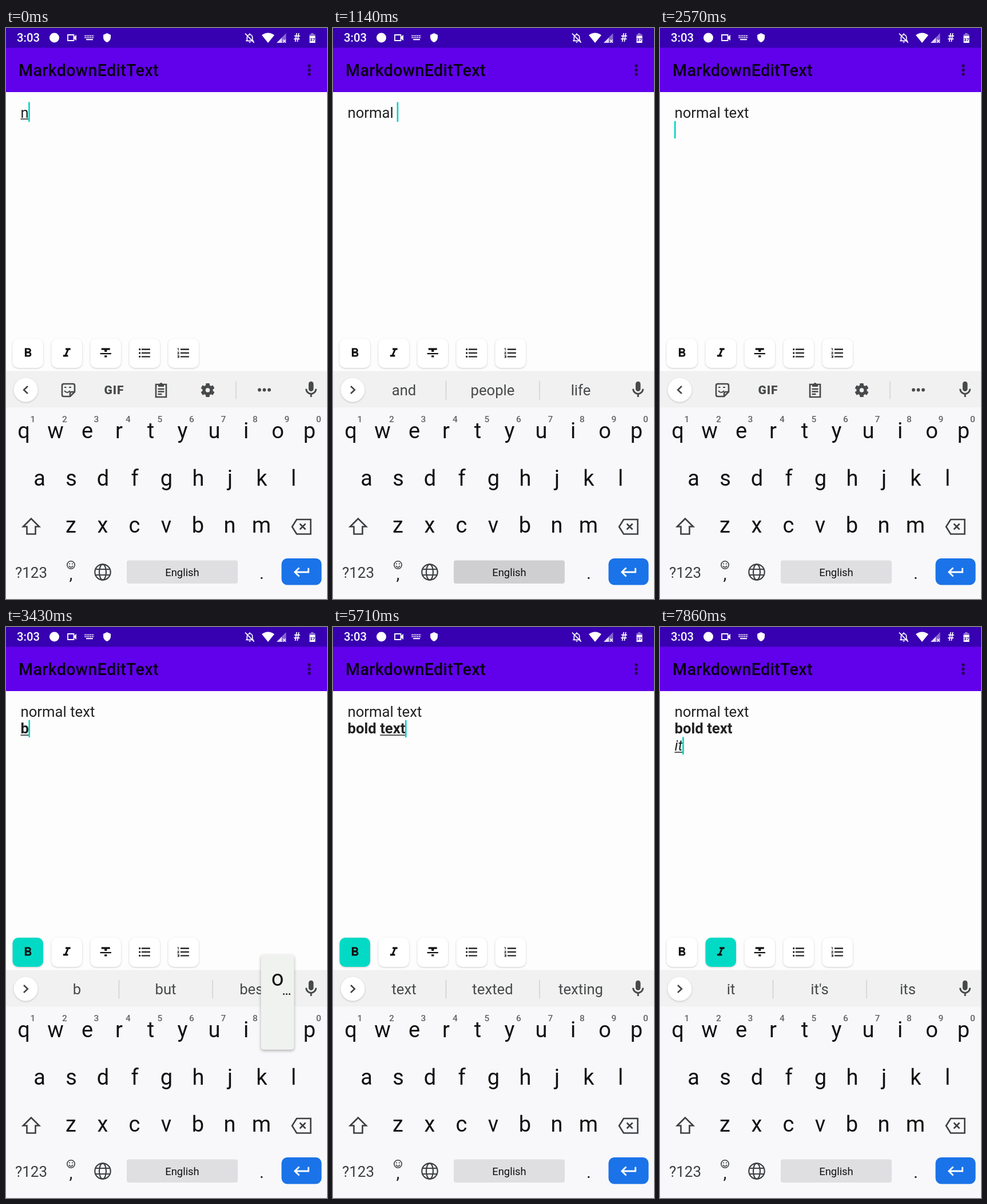
These frames come from a looping animation (561x998 px, 8 s). An HTML page:

```html
<!DOCTYPE html>
<html lang="en">
<head>
<meta charset="utf-8">
<title>Markdown editor</title>
<style>
html, body { margin: 0; width: 100%; height: 100%; overflow: hidden; background: #fefdfe; }
svg { display: block; width: 100vw; height: 100vh; font-family: Roboto, "Noto Sans", sans-serif; }
text { white-space: pre; }
.mid { text-anchor: middle; }
.line { fill: none; stroke: currentColor; stroke-width: 2.6; }
.card { filter: drop-shadow(0 1.5px 1.5px rgba(0, 0, 0, .2)); }
.popup { filter: drop-shadow(0 2px 2.5px rgba(0, 0, 0, .3)); }
</style>
</head>
<body>
<svg viewBox="0 0 561 998">
  <rect width="561" height="998" fill="#fefdfe"/>

  <rect width="561" height="35" fill="#3700b1"/>
  <g fill="#fff" color="#fff">
    <text x="19" y="24.3" font-size="20.3" font-weight="500">3:03</text>
    <circle cx="84.500" cy="17" r="8.500"/>
    <path class="line" style="stroke-width:1.8" d="M108 12h10.500v10H108z"/>
    <path d="M118 16l5-4v10l-5-4z"/>
    <g stroke="#fff" stroke-width="2" stroke-dasharray="2 1.2" fill="none">
      <path d="M137.500 13.500H154M137.500 16.700H154"/>
      <path d="M140 20.200H152" stroke-dasharray="none"/>
    </g>
    <path transform="translate(167.900 8.400) scale(.72)" d="M12 1L3 5v6c0 5.550 3.840 10.740 9 12 5.160-1.260 9-6.450 9-12V5z"/>
    <g transform="translate(415.800 7) scale(.85)">
      <path class="line" style="stroke-width:2" d="M6.500 17.500V11a5.500 5.500 0 0 1 11 0v6.500M4 18h16M12 5V2.500M2.500 3L21 22"/>
      <path d="M10 20h4a2 2 0 0 1-4 0z"/>
    </g>
    <path d="M458 26L447 12.500Q458 4.500 469 12.500z"/>
    <path d="M473 26H489.500V9z" opacity=".4"/>
    <path d="M473 26H482V17z" opacity=".75"/>
    <path d="M484 20.500l5 5m0-5l-5 5" stroke="#fff" stroke-width="1.300"/>
    <text class="mid" x="508.500" y="24" font-size="20" font-weight="700">#</text>
    <path d="M530.500 11h2.500V9h4.500v2h3v5h-10z" opacity=".45"/>
    <path d="M530.500 14h10v12h-10z"/>
    <text class="mid" x="535.500" y="23" font-size="8" font-weight="700" fill="#3700b1">37</text>
  </g>

  <rect y="34.500" width="561" height="77.500" fill="#6100eb"/>
  <text x="22" y="84" font-size="28.600" font-weight="500" letter-spacing=".36" fill="#08000f">MarkdownEditText</text>
  <g fill="#25074f"><circle cx="530" cy="66" r="2.700"/><circle cx="530" cy="73.500" r="2.700"/><circle cx="530" cy="81" r="2.700"/></g>

  <g id="editor" font-size="25.700" fill="#222"></g>
  <rect id="underline" height="1.500" fill="#222"/>
  <rect id="cursor" width="2.700" fill="#08d5c2"/>
  <g id="buttons"></g>

  <rect y="599.500" width="561" height="64" fill="#f0f1f0"/>
  <rect y="663.500" width="561" height="335" fill="#f8f8fa"/>
  <circle class="card" cx="34.500" cy="632.500" r="21" fill="#fff"/>
  <path id="chevron" class="line" color="#444"/>

  <g id="tools" color="#47494b" fill="#47494b">
    <path class="line" d="M101 622h16q3 0 3 3v11l-8 8h-11q-3 0-3-3v-16q0-3 3-3zM120 636h-5q-3 0-3 3v5"/>
    <path class="line" style="stroke-width:2" d="M102 634q5 6 10 0M102 628h3.500M110 628h4"/>
    <text class="mid" x="189" y="640" font-size="21" font-weight="900" letter-spacing="1">GIF</text>
    <path class="line" d="M262 623h18v22h-18zM265.500 631h11M265.500 635.500h11M265.500 640h7"/>
    <path d="M266 622h2.500a2.600 2.600 0 0 1 5 0h2.500v5h-10z"/>
    <g id="gear" transform="translate(352.500 633)"><circle r="6.500" fill="none" stroke="currentColor" stroke-width="5.500"/></g>
    <path d="M402 617.500v31" stroke="#d0d2d2" stroke-width="1.500"/>
    <circle cx="443" cy="632.500" r="2.900"/><circle cx="451.500" cy="632.500" r="2.900"/><circle cx="460" cy="632.500" r="2.900"/>
  </g>
  <g id="suggestions" font-size="25.700" fill="#47494b">
    <path d="M197.500 616.500v33M361 616.500v33" stroke="#cfd1d0" stroke-width="1.500"/>
  </g>
  <path fill="#47494b" transform="translate(516 615) scale(1.430)" d="M12 14c1.660 0 3-1.340 3-3V5a3 3 0 0 0-6 0v6c0 1.660 1.340 3 3 3zm5-3a5 5 0 0 1-10 0H5c0 3.530 2.610 6.430 6 6.920V21h2v-3.080c3.390-.49 6-3.390 6-6.920z"/>

  <g id="keys" font-size="38" fill="#111"></g>
  <g color="#3c3f42" fill="#3c3f42">
    <path class="line" d="M44 857.500L30 871.500h6.500v13h15v-13H58z"/>
    <path class="line" d="M508 859h24.500v25.500H508l-8-12.750zM513.500 866.500l10 10m0-10l-10 10"/>
    <text class="mid" x="44" y="960.500" font-size="26">?123</text>
    <circle class="line" style="stroke-width:1.600" cx="113.500" cy="938.500" r="6.700"/>
    <path class="line" style="stroke-width:1.600" d="M109.800 940q3.700 5 7.400 0"/>
    <circle cx="111" cy="936.500" r="1.100"/><circle cx="116" cy="936.500" r="1.100"/>
    <text class="mid" x="113.500" y="964" font-size="30" fill="#222">,</text>
    <g class="line" style="stroke-width:2.200"><circle cx="169" cy="951" r="13.700"/><ellipse cx="169" cy="951" rx="6" ry="13.700"/><path d="M156.500 946h25M156.500 956h25"/></g>
    <text class="mid" x="447" y="963" font-size="30" fill="#222">.</text>
  </g>
  <rect id="space" x="211" y="930.500" width="194" height="40.500" rx="4"/>
  <text class="mid" x="308" y="957.500" font-size="18.400" fill="#111">English</text>
  <rect id="enter" x="481.500" y="927" width="70" height="46.500" rx="10"/>
  <path fill="#fff" transform="translate(500 933.800) scale(1.430)" d="M19 7v4H5.830l3.580-3.590L8 6l-6 6 6 6 1.410-1.410L5.830 13H21V7z"/>

  <g id="popup" font-size="38" fill="#111">
    <rect class="popup" x="-29" y="-144" width="58" height="166" rx="5" fill="#f0f2ef"/>
    <text class="mid" y="-90"></text>
    <g><circle cx="11" cy="-75" r="1.400"/><circle cx="16" cy="-75" r="1.400"/><circle cx="21" cy="-75" r="1.400"/></g>
  </g>
</svg>
<script>
const $ = id => document.getElementById(id);

function add(parent, tag, attrs, text = '') {
  const el = document.createElementNS('http://www.w3.org/2000/svg', tag);
  for (const name in attrs) el.setAttribute(name, attrs[name]);
  el.textContent = text;
  parent.append(el);
  return el;
}

const set = (el, attrs) => { for (const name in attrs) el.setAttribute(name, attrs[name]); };
const show = (el, visible) => { el.style.display = visible ? '' : 'none'; };

// Keyboard
const rows = [['qwertyuiop', 31, 717], ['asdfghjkl', 58.5, 799.5], ['zxcvbnm', 113.5, 882]];
const keyAt = {};
for (const [letters, left, y] of rows) {
  [...letters].forEach((letter, i) => {
    const x = left + i * 55.5;
    keyAt[letter] = { x, y };
    add($('keys'), 'text', { class: 'mid', x, y }, letter);
    if (y === 717) add($('keys'), 'text', { class: 'mid', x: x + 16, y: 689, 'font-size': 15.5, 'font-weight': 500, fill: '#626467' }, (i + 1) % 10);
  });
}
const hasMore = 'qwertyuiopasczn';

for (let i = 0; i < 6; i++) {
  add($('gear'), 'rect', { x: -3.3, y: -12, width: 6.6, height: 6, rx: 1, transform: `rotate(${i * 60})` });
}

// Formatting buttons
const bars = 'M7 19h14v-2H7zm0-6h14v-2H7zm0-8v2h14V5z';
const dot = y => `M2.500 ${y}a1.500 1.500 0 0 1 3 0a1.500 1.500 0 0 1-3 0z`;
const icons = [
  'M15.600 10.790c.97-.67 1.650-1.770 1.650-2.790 0-2.260-1.750-4-4-4H7v14h7.040c2.090 0 3.710-1.700 3.710-3.790 0-1.520-.86-2.820-2.150-3.420zM10 6.500h3a1.500 1.500 0 0 1 0 3h-3zm3.500 9H10v-3h3.500a1.500 1.500 0 0 1 0 3z',
  'M10 4v3h2.210l-3.420 8H6v3h8v-3h-2.210l3.420-8H18V4z',
  'M10 19h4v-3h-4zM5 4v3h5v3h4V7h5V4zM3 14h18v-2H3z',
  bars + dot(6) + dot(12) + dot(18),
  bars + 'M2 17h2v.5H3v1h1v.5H2v1h3v-4H2zm1-9h1V4H2v1h1zm-1 3h1.800L2 13.100v.9h3v-1H3.200L5 10.900V10H2z'
];
const cards = icons.map((d, i) => {
  const x = 11.5 + i * 68;
  const card = add($('buttons'), 'rect', { class: 'card', x, y: 543, width: 53.5, height: 51, rx: 10 });
  add($('buttons'), 'path', { d, transform: `translate(${x + 13.9} 555.2) scale(1.071)`, fill: '#111' });
  return card;
});

// Text lines and suggestions
const finished = ['normal text', 'bold text'];
const baseline = i => 156.5 + i * 29.9;
const textX = 25.5;
const lines = [{}, { 'font-weight': 700 }, { 'font-style': 'italic' }]
  .map((style, i) => add($('editor'), 'text', { x: textX, y: baseline(i), ...style }));
const words = [124, 279, 433].map(x => add($('suggestions'), 'text', { class: 'mid', x, y: 642 }));

// Each step changes the state before it; "_" marks where the composed word begins.
const steps = [];
let state = { line: 0, text: '', suggest: '', active: -1, caret: true };
function step(time, change) {
  state = { ...state, popup: '', press: '', ...change, time };
  steps.push(state);
}

step(0, { text: '_n' });
step(140, { popup: 'o', suggest: 'n no not' });
step(290, { text: '_no', popup: 'r', suggest: 'no not now' });
step(430, { text: '_nor', popup: 'm', suggest: 'nor norm normal' });
step(570, { text: '_norm', popup: 'a', suggest: 'norm normal Norm' });
step(860, { text: '_norma', popup: 'l', suggest: 'norma normal normally' });
step(1000, { text: '_normal', suggest: 'normal normally Normal' });
step(1140, { text: 'normal ', press: 'space', suggest: 'and people life' });
step(1290, { popup: 't' });
step(1570, { text: 'normal _t', popup: 'e', suggest: 't the to' });
step(1710, { text: 'normal _te', popup: 'x', suggest: 'te the tell' });
step(1860, { text: 'normal _tex', popup: 't', suggest: 'tex text texts' });
step(2000, { text: 'normal _text', suggest: 'text texted texting' });
step(2290, { press: 'enter' });
step(2430, { line: 1, text: '', press: 'enter', suggest: '' });
step(2570, {});
step(3000, { press: 0 });
step(3140, { active: 0 });
step(3290, { popup: 'b' });
step(3430, { text: '_b', popup: 'o', suggest: 'b but best' });
step(3570, { text: '_bo', popup: 'l', suggest: 'bo box boy' });
step(3710, { text: '_bol', popup: 'd', suggest: 'bol bold bolt' });
step(3860, { text: '_bold', suggest: 'bold bolder Bold' });
step(4000, { text: 'bold ', press: 'space', suggest: 'and the text' });
step(4140, {});
step(4290, { popup: 't' });
step(4430, { text: 'bold _t', popup: 'e', suggest: 't the to' });
step(4570, { text: 'bold _te', popup: 'x', suggest: 'te the tell' });
step(4710, { text: 'bold _tex', popup: 't', suggest: 'tex text texts' });
step(4860, { text: 'bold _text', suggest: 'text texted texting' });
step(5290, { caret: false });
step(5710, { caret: true });
step(6290, { press: 'enter' });
step(6430, { line: 2, text: '', suggest: '', caret: false });
step(7000, { active: -1, caret: true });
step(7140, { press: 1 });
step(7290, { active: 1 });
step(7430, { popup: 'i' });
step(7710, { text: '_i', popup: 't', suggest: "i I I'm" });
step(7860, { text: '_it', suggest: "it it's its" });

function drawEditor({ line, text, caret }) {
  const start = text.indexOf('_');
  const plain = text.replace('_', '');
  lines.forEach((el, i) => { el.textContent = i < line ? finished[i] : i === line ? plain : ''; });
  const width = plain ? lines[line].getComputedTextLength() : 0;
  const before = start > 0 ? lines[line].getSubStringLength(0, start) : 0;
  const y = baseline(line);
  set($('underline'), { x: textX + before, y: y + 1.8, width: start < 0 ? 0 : width - before });
  set($('cursor'), { x: textX + width - .6, y: line ? y - 23.8 : 129.5, height: line ? 30.3 : 34.5 });
  show($('cursor'), caret);
}

function drawKeyboard({ popup, press, suggest, active }) {
  show($('tools'), !suggest);
  show($('suggestions'), suggest);
  set($('chevron'), { d: suggest ? 'M31 626l6.800 6.500-6.800 6.500' : 'M38 626l-6.800 6.500 6.800 6.500' });
  suggest.split(' ').forEach((word, i) => { words[i].textContent = word; });
  cards.forEach((card, i) => set(card, { fill: i === active ? '#03dac5' : i === press ? '#e6e6e6' : '#fff' }));
  set($('space'), { fill: press === 'space' ? '#cfcfd2' : '#dfdee1' });
  set($('enter'), { fill: press === 'enter' ? '#1866cf' : '#1a73e8' });
  show($('popup'), popup);
  if (!popup) return;
  const { x, y } = keyAt[popup];
  const [, label, more] = $('popup').children;
  set($('popup'), { transform: `translate(${x - .5} ${y - .3})` });
  label.textContent = popup;
  show(more, hasMore.includes(popup));
}

let drawn;
function frame() {
  const time = performance.now() % 8000;
  const current = steps.findLast(s => s.time <= time);
  if (current !== drawn) {
    drawEditor(current);
    drawKeyboard(current);
    drawn = current;
  }
  requestAnimationFrame(frame);
}
frame();
</script>
</body>
</html>
```
